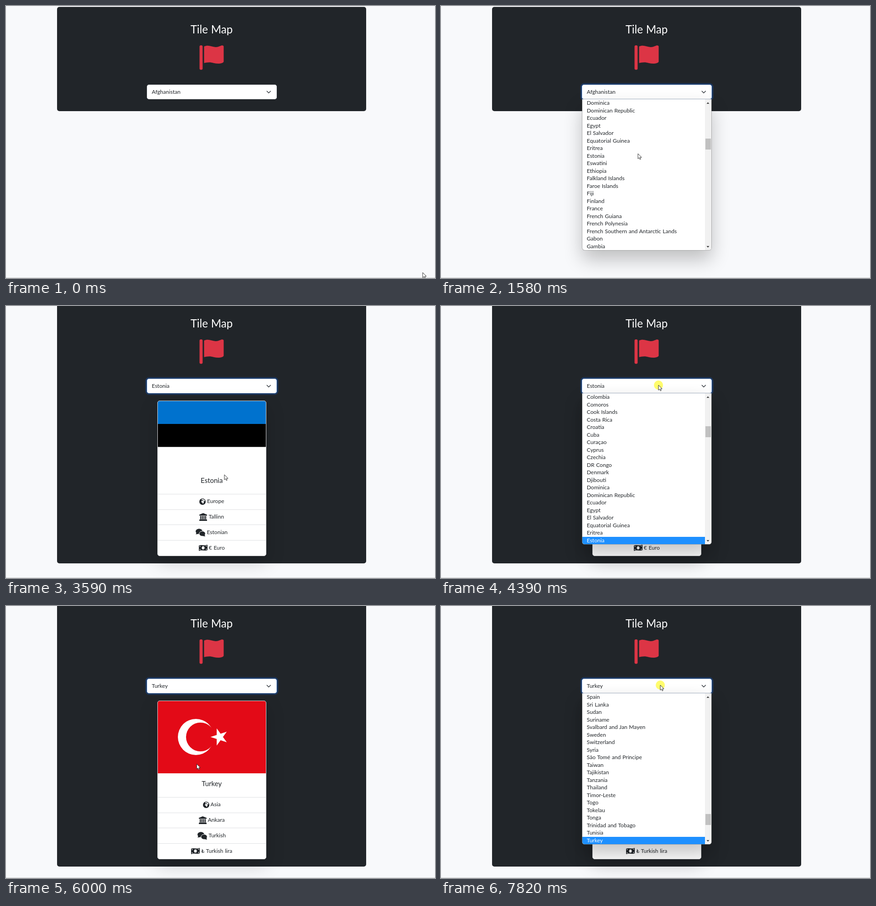
Write an HTML page that moves like this. It is 941 by 595 pixels and loops after 8 s.

```html
<!DOCTYPE html>
<html lang="en">
<head>
<meta charset="utf-8">
<title>Country picker</title>
<style>
  html, body { margin: 0; width: 100%; height: 100%; overflow: hidden; background: #f8f9fb; }
  body { position: relative; font: 12.05px/16.5px Lato, 'Noto Sans', sans-serif; word-spacing: .05em; color: #212529; }
  body > *, #page > * { position: absolute; box-sizing: border-box; }
  svg { display: block; overflow: visible; }
  #page { left: 0; top: 0; width: 941px; height: 595px; }
  #panel { left: 112px; top: 1.7px; width: 678px; border-radius: 5px; background: #212529; }
  #title { left: 112px; top: 31px; width: 678px; text-align: center; color: #fff; font-size: 24.1px; line-height: 40px; }
  #logo { left: 424px; top: 86px; fill: #dc3545; }
  #select { left: 309px; top: 172px; width: 284.5px; height: 31.5px; padding-left: 10.8px; line-height: 31.5px;
    border-radius: 5px; background: #fff; box-shadow: inset 0 0 0 .6px #ced4da; }
  #select.focus { box-shadow: inset 0 0 0 .6px #86b7fe, 0 0 0 3.3px #1c375e; }
  #chevron { left: 572px; top: 185.5px; fill: none; stroke: #343a40; stroke-width: 1.5; stroke-linecap: round; stroke-linejoin: round; }
  #card { left: 332px; top: 219.6px; width: 238.5px; border: 1px solid #d5d6d8; border-radius: 5px; background: #fff;
    overflow: hidden; text-align: center; box-shadow: 0 13px 40px rgba(0,0,0,.175); }
  #name { height: 52.3px; font-size: 15px; line-height: 44px; }
  .fact { display: flex; align-items: center; justify-content: center; gap: 3px; box-sizing: border-box;
    height: 33.7px; padding-bottom: 1px; border-top: 1px solid #dee0e2; }
  #list { left: 310px; top: 204px; width: 282.5px; height: 330px; background: #fff; border-radius: 0 0 5px 5px;
    overflow: hidden; box-shadow: 0 0 0 .6px #888, 0 20px 40px rgba(0,0,0,.24); }
  #rows div { width: 269px; box-sizing: border-box; height: 16.5px; padding-left: 9.8px; white-space: nowrap; }
  #rows .on { background: #1e90ff; color: #fff; }
  #bar { position: absolute; right: 0; top: 0; width: 13.5px; height: 330px; background: #f1f1f1; }
  #thumb { position: absolute; left: 1px; width: 11.5px; height: 24px; background: #c1c1c1; }
  #bar svg { position: absolute; left: 0; top: 0; fill: #404040; }
  #edge { left: 0; top: 594px; width: 100%; height: 1px; background: #d0d0d0; }
  #halo { left: 0; top: 0; width: 20px; height: 20px; margin: -10px; border-radius: 50%; background: rgba(255,250,30,.65); }
  #cursor { left: 0; top: 0; fill: #fff; stroke: #1c1c1c; stroke-width: .9; stroke-linejoin: round; }
</style>
</head>
<body>
<div id="page">
  <div id="panel"></div>
  <div id="title">Tile Map</div>
  <svg id="logo" width="54" height="54">
    <rect x=".5" width="6.8" height="53.5" rx="3"/>
    <path d="M10.5 2.5C20-2 27 3.5 36 4C42 4 46 1 49.5 .3Q53.5 0 53.5 3V35Q53.5 37.5 50.5 38.4C40 42.5 32 38 24 37.2C18 37 14 38 10.5 38.8Z"/>
  </svg>
  <div id="select"></div>
  <svg id="chevron" width="9" height="5"><path d="M.3.3 4.3 4.3 8.3.3"/></svg>
  <div id="card"><svg id="flag" width="237"></svg><div id="name"></div><div id="facts"></div></div>
  <div id="list">
    <div id="rows"></div>
    <div id="bar"><div id="thumb"></div>
      <svg width="13" height="330"><path d="M3.5 10H9.5L6.5 6.5ZM3.5 321H9.5L6.5 324.5Z"/></svg>
    </div>
  </div>
</div>
<div id="edge"></div>
<div id="halo"></div>
<svg id="cursor" width="9" height="14"><path d="M0 0V11.2L2.6 8.8 4.3 12.7 6.1 11.9 4.5 8.2H8Z"/></svg>
<script>
const $ = id => document.getElementById(id);

const countries = ('Afghanistan|Albania|Algeria|American Samoa|Andorra|Angola|Anguilla|Antarctica|Antigua and Barbuda|Argentina|' +
  'Armenia|Aruba|Australia|Austria|Azerbaijan|Bahamas|Bahrain|Bangladesh|Barbados|Belarus|Belgium|Belize|Benin|Bermuda|Bhutan|' +
  'Bolivia|Bosnia and Herzegovina|Botswana|Bouvet Island|Brazil|British Indian Ocean Territory|British Virgin Islands|Brunei|' +
  'Bulgaria|Burkina Faso|Burundi|Cambodia|Cameroon|Canada|Cape Verde|Caribbean Netherlands|Cayman Islands|' +
  'Central African Republic|Chad|Chile|China|Christmas Island|Cocos (Keeling) Islands|Colombia|Comoros|Cook Islands|Costa Rica|' +
  'Croatia|Cuba|Curaçao|Cyprus|Czechia|DR Congo|Denmark|Djibouti|Dominica|Dominican Republic|Ecuador|Egypt|El Salvador|' +
  'Equatorial Guinea|Eritrea|Estonia|Eswatini|Ethiopia|Falkland Islands|Faroe Islands|Fiji|Finland|France|French Guiana|' +
  'French Polynesia|French Southern and Antarctic Lands|Gabon|Gambia|Georgia|Germany|Ghana|Gibraltar|Greece|Greenland|Grenada|' +
  'Guadeloupe|Guam|Guatemala|Guernsey|Guinea|Guinea-Bissau|Guyana|Haiti|Heard Island and McDonald Islands|Honduras|Hong Kong|' +
  'Hungary|Iceland|India|Indonesia|Iran|Iraq|Ireland|Isle of Man|Israel|Italy|Ivory Coast|Jamaica|Japan|Jersey|Jordan|' +
  'Kazakhstan|Kenya|Kiribati|Kosovo|Kuwait|Kyrgyzstan|Laos|Latvia|Lebanon|Lesotho|Liberia|Libya|Liechtenstein|Lithuania|' +
  'Luxembourg|Macau|Madagascar|Malawi|Malaysia|Maldives|Mali|Malta|Marshall Islands|Martinique|Mauritania|Mauritius|Mayotte|' +
  'Mexico|Micronesia|Moldova|Monaco|Mongolia|Montenegro|Montserrat|Morocco|Mozambique|Myanmar|Namibia|Nauru|Nepal|Netherlands|' +
  'New Caledonia|New Zealand|Nicaragua|Niger|Nigeria|Niue|Norfolk Island|North Korea|North Macedonia|Northern Mariana Islands|' +
  'Norway|Oman|Pakistan|Palau|Palestine|Panama|Papua New Guinea|Paraguay|Peru|Philippines|Pitcairn Islands|Poland|Portugal|' +
  'Puerto Rico|Qatar|Republic of the Congo|Romania|Russia|Rwanda|Réunion|Saint Barthélemy|' +
  'Saint Helena, Ascension and Tristan da Cunha|Saint Kitts and Nevis|Saint Lucia|Saint Martin|Saint Pierre and Miquelon|' +
  'Saint Vincent and the Grenadines|Samoa|San Marino|Saudi Arabia|Senegal|Serbia|Seychelles|Sierra Leone|Singapore|Sint Maarten|' +
  'Slovakia|Slovenia|Solomon Islands|Somalia|South Africa|South Georgia|South Korea|South Sudan|Spain|Sri Lanka|Sudan|Suriname|' +
  'Svalbard and Jan Mayen|Sweden|Switzerland|Syria|São Tomé and Príncipe|Taiwan|Tajikistan|Tanzania|Thailand|Timor-Leste|Togo|' +
  'Tokelau|Tonga|Trinidad and Tobago|Tunisia|Turkey|Turkmenistan|Turks and Caicos Islands|Tuvalu|Uganda|Ukraine|' +
  'United Arab Emirates|United Kingdom|United States|United States Minor Outlying Islands|United States Virgin Islands|Uruguay|' +
  'Uzbekistan|Vanuatu|Vatican City|Venezuela|Vietnam|Wallis and Futuna|Western Sahara|Yemen|Zambia|Zimbabwe|Åland Islands').split('|');
const at = name => countries.indexOf(name);

const icon = (w, h, body) => `<svg width="${w}" height="${h}" fill="#212529">${body}</svg>`;
const icons = [
  icon(14, 14, '<circle cx="7" cy="7" r="7"/><path fill="#fff" d="M4.9 1.7 5.3 3V4H6L6.5 3.5 7.3 3.7 8.2 3.4 9.3 4 9 5H8L7 4.9 4.8 5.8 4.4 6.7 4.5 8 5.7 8.7 6.9 8.9 7 10.5 7.9 11.4 8.6 11 9.6 9.3 9.7 8.6 10.4 7.7 9.2 6.3 10 5.8 11.5 5.5 12.6 5.4 10.5 2.2 7 1.3Z"/>'),
  icon(17, 17, '<path d="M8.5 0 17 3.5V5.5H0V3.5ZM2 6.3h2.3v6.8H2zM5.6 6.3h2.3v6.8H5.6zM9.2 6.3h2.3v6.8H9.2zM12.8 6.3h2.3v6.8H12.8zM1 13.5H16L17 15.3V17H0V15.3Z"/>'),
  icon(21, 17, '<ellipse cx="7.5" cy="6" rx="7.5" ry="5.8"/><path d="M.3 12.5 2 8 6 11.5Z"/><ellipse cx="14.5" cy="11" rx="6.8" ry="5.5" stroke="#fff"/><path d="M21 17 19.5 13 15 16Z"/>'),
  icon(19, 14, '<path d="M0 2C6-1 12 3.5 18 .3Q19 .3 19 1.3V12C13 15 7 10.5 1 13.7Q0 13.7 0 12.7Z"/><g fill="#fff"><ellipse cx="9.5" cy="7" rx="3" ry="3.5"/><circle cx="2.5" cy="3.8" r="1"/><circle cx="16.5" cy="3" r="1"/><circle cx="2.5" cy="11" r="1"/><circle cx="16.5" cy="10.2" r="1"/></g>')
];

const cards = {
  Estonia: {
    height: 151, facts: ['Europe', 'Tallinn', 'Estonian', '€ Euro'],
    flag: '<rect width="237" height="50" fill="#0072ce"/><rect y="50" width="237" height="50.3"/>'
  },
  Turkey: {
    height: 158, facts: ['Asia', 'Ankara', 'Turkish', '₺ Turkish lira'],
    flag: '<rect width="237" height="158" fill="#e30a17"/><circle cx="83.5" cy="78.5" r="39.5" fill="#fff"/>' +
      '<circle cx="93.5" cy="78.5" r="31.6" fill="#e30a17"/>' +
      '<path transform="translate(135.3 78.5)" fill="#fff" d="M-19.7 0 15.9-11.6-6.1 18.7V-18.7L15.9 11.6Z"/>'
  }
};

// Tracks: [time, value...], linear between entries
const cursorTrack = [
  [0, 914, 583], [1000, 450, 174], [1200, 452, 235], [1400, 440, 310], [1600, 432, 323], [2000, 432, 323],
  [2600, 464, 300], [3400, 472, 345], [3600, 479, 369], [4000, 478, 250], [4400, 477, 173], [4600, 476, 235],
  [4800, 475, 262], [5200, 475, 267], [5400, 440, 345], [5800, 440, 345], [6400, 375, 347], [6600, 375, 347],
  [7000, 560, 300], [7200, 640, 250], [7600, 500, 185], [7800, 481, 173]
];
const pageTrack = [[3200, 0], [3400, 5], [3600, 13]];
const listTrack = [
  [1200, 0], [1600, at('Dominica')], [4399, at('Dominica')], [4400, at('Estonia') - 19], [4600, at('Estonia') - 19],
  [5200, at('Qatar')], [5400, at('Turkey') - 9], [7799, at('Turkey') - 9], [7800, at('Turkey') - 19]
];

function sample(track, t) {
  const i = track.findIndex(k => k[0] > t);
  if (i === 0) return track[0].slice(1);
  if (i < 0) return track[track.length - 1].slice(1);
  const a = track[i - 1], b = track[i], u = (t - a[0]) / (b[0] - a[0]);
  return a.slice(1).map((v, j) => v + (b[j + 1] - v) * u);
}

function showCard(name) {
  const card = cards[name];
  $('card').hidden = !card;
  $('panel').style.height = (card ? 423 + card.height : 228) + 'px';
  if (!card) return;
  $('flag').setAttribute('height', card.height);
  $('flag').innerHTML = card.flag;
  $('name').textContent = name;
  $('facts').innerHTML = card.facts.map((f, i) => `<div class="fact">${icons[i]}<span>${f}</span></div>`).join('');
}

function showList(t, value) {
  const open = t >= 1000 && t < 2000 || t >= 4400 && t < 5800 || t >= 7800;
  $('list').hidden = !open;
  if (!open) return;
  const top = Math.round(sample(listTrack, t)[0]);
  const active = t >= 5400 ? 'Turkey' : value;
  $('rows').innerHTML = countries.slice(top, top + 20)
    .map(c => `<div${c === active ? ' class="on"' : ''}>${c}</div>`).join('');
  $('thumb').style.top = 14 + top * 1.2 + 'px';
}

function render(t) {
  const value = t < 2000 ? 'Afghanistan' : t < 5800 ? 'Estonia' : 'Turkey';
  $('select').textContent = value;
  $('select').className = t >= 1000 ? 'focus' : '';
  showCard(t < 2400 ? '' : t < 6000 ? 'Estonia' : 'Turkey');
  showList(t, value);
  $('page').style.transform = `translateY(${-sample(pageTrack, t)[0]}px)`;
  const [x, y] = sample(cursorTrack, t);
  $('cursor').style.transform = $('halo').style.transform = `translate(${x}px, ${y}px)`;
  $('halo').hidden = ![1000, 4400, 7800].includes(t);
}

// The picture advances five times a second
let shown = -1;
function frame() {
  const tick = Math.floor((performance.now() % 8000 + 20) / 200) % 40 * 200;
  if (tick !== shown) render(shown = tick);
  requestAnimationFrame(frame);
}
frame();
</script>
</body>
</html>
```
